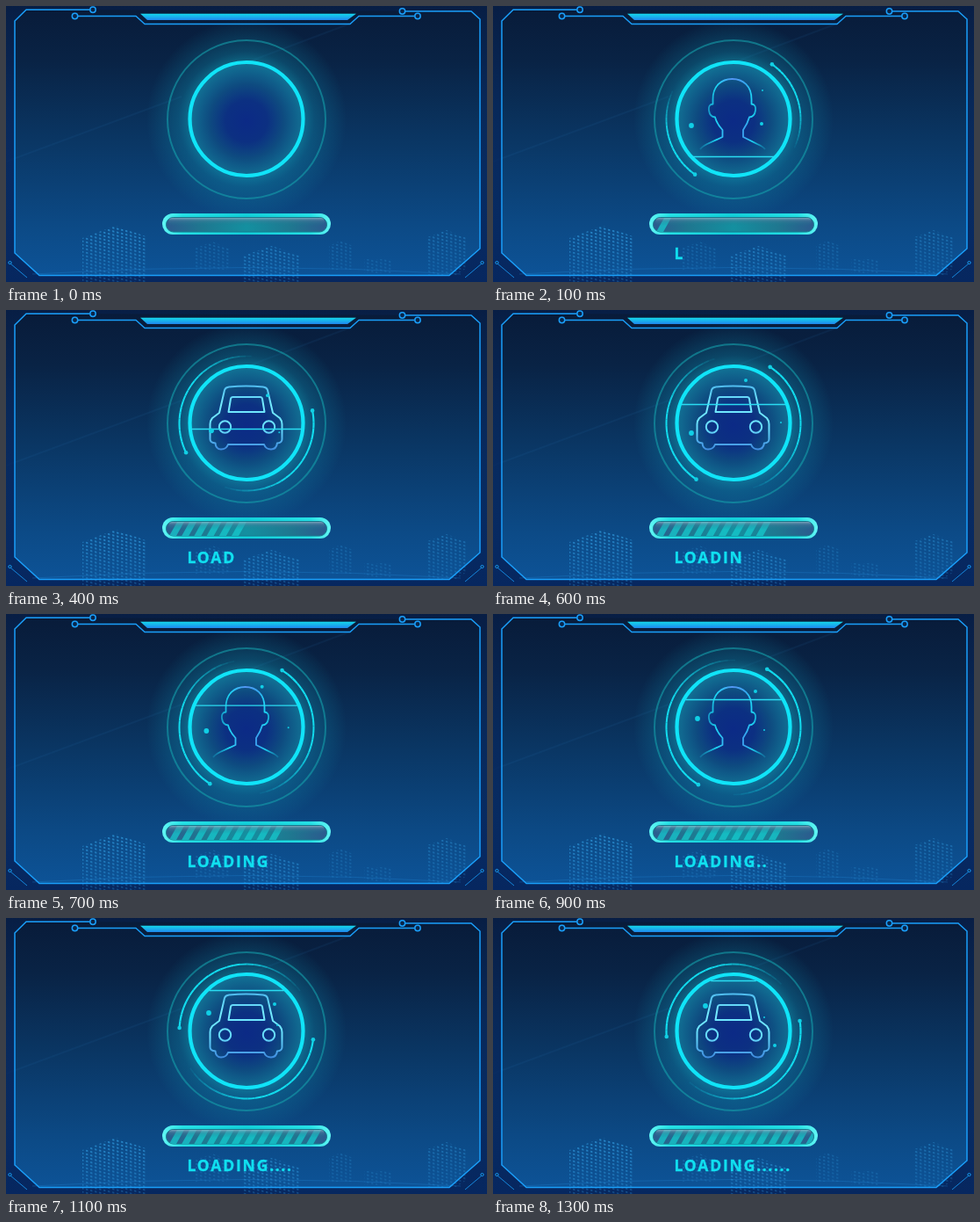
Write an HTML page that moves like this. It is 548 by 314 pixels and loops after 1400 ms.

```html
<!DOCTYPE html>
<html lang="en">
<head>
<meta charset="utf-8">
<title>Loading</title>
<style>
html, body { margin: 0; width: 100%; height: 100%; overflow: hidden; background: #0a2a55; }
svg { display: block; width: 100vw; height: 100vh; }
text { font: bold 17.5px "Open Sans", "Noto Sans", sans-serif; fill: #10e0f0; stroke: #10e0f0; stroke-width: .35px; }
</style>
</head>
<body>
<svg viewBox="0 0 548 314" fill="none">
  <defs>
    <linearGradient id="sky" x2="0" y2="1">
      <stop offset="0" stop-color="#081b39"/>
      <stop offset=".2" stop-color="#092345"/>
      <stop offset=".5" stop-color="#0a3765"/>
      <stop offset=".8" stop-color="#0c4a86"/>
      <stop offset="1" stop-color="#0d5499"/>
    </linearGradient>
    <linearGradient id="rim" x2="0" y2="1">
      <stop offset="0" stop-color="#07245a" stop-opacity=".35"/>
      <stop offset=".5" stop-color="#07245a" stop-opacity=".7"/>
      <stop offset="1" stop-color="#06235a" stop-opacity=".92"/>
    </linearGradient>
    <linearGradient id="title" x2="0" y2="1">
      <stop offset="0" stop-color="#14d6e8"/>
      <stop offset=".45" stop-color="#18b4ec"/>
      <stop offset="1" stop-color="#1f88ee"/>
    </linearGradient>
    <radialGradient id="halo" gradientUnits="userSpaceOnUse" cx="274" cy="129" r="114">
      <stop offset=".55" stop-color="#12a0b8" stop-opacity=".58"/>
      <stop offset=".68" stop-color="#0f8cac" stop-opacity=".34"/>
      <stop offset=".8" stop-color="#0f8cac" stop-opacity=".21"/>
      <stop offset="1" stop-color="#0f8cac" stop-opacity="0"/>
    </radialGradient>
    <radialGradient id="core" gradientUnits="userSpaceOnUse" cx="274" cy="131" r="68">
      <stop offset="0" stop-color="#0c2a86"/>
      <stop offset=".35" stop-color="#0c3082"/>
      <stop offset=".62" stop-color="#0e4b80"/>
      <stop offset="1" stop-color="#127697"/>
    </radialGradient>
    <linearGradient id="pill">
      <stop offset="0" stop-color="#62f6f4"/>
      <stop offset=".12" stop-color="#25dfe4"/>
      <stop offset=".5" stop-color="#12ced8"/>
      <stop offset=".88" stop-color="#25dfe4"/>
      <stop offset="1" stop-color="#62f6f4"/>
    </linearGradient>
    <linearGradient id="well">
      <stop offset="0" stop-color="#2c5a8e"/>
      <stop offset=".22" stop-color="#1f7790"/>
      <stop offset=".5" stop-color="#1490a0"/>
      <stop offset=".78" stop-color="#1f7790"/>
      <stop offset="1" stop-color="#2c5a8e"/>
    </linearGradient>
    <linearGradient id="gloss" x2="0" y2="1">
      <stop offset="0" stop-color="#93b6c8" stop-opacity=".75"/>
      <stop offset=".4" stop-color="#4c7f9c" stop-opacity=".4"/>
      <stop offset="1" stop-color="#0f7f90" stop-opacity="0"/>
    </linearGradient>
    <linearGradient id="skin" gradientUnits="userSpaceOnUse" x1="236" y1="0" x2="310" y2="0">
      <stop offset="0" stop-color="#1ad0ee" stop-opacity=".2"/>
      <stop offset=".25" stop-color="#1cd6f4"/>
      <stop offset=".5" stop-color="#5594f4"/>
      <stop offset=".7" stop-color="#35a8f0"/>
      <stop offset=".8" stop-color="#1cd6f4"/>
      <stop offset="1" stop-color="#1ad0ee" stop-opacity=".2"/>
    </linearGradient>
    <linearGradient id="paint" gradientUnits="userSpaceOnUse" x1="0" y1="86" x2="0" y2="159">
      <stop offset="0" stop-color="#4fbcf0"/>
      <stop offset=".3" stop-color="#74ecff"/>
      <stop offset=".68" stop-color="#66dcfc"/>
      <stop offset="1" stop-color="#3f8ce0"/>
    </linearGradient>
    <linearGradient id="fade" x2="0" y2="1">
      <stop offset="0" stop-color="#fff"/>
      <stop offset="1" stop-color="#fff" stop-opacity=".4"/>
    </linearGradient>
    <pattern id="lights" width="5" height="4" patternUnits="userSpaceOnUse" patternTransform="skewY(14)">
      <path d="M1 1h2.400v1.800h-2.400z" fill="#35a8ee"/>
    </pattern>
    <mask id="dim"><path d="M0 245H548V314H0z" fill="url(#fade)"/></mask>
    <clipPath id="wellClip"><rect x="183" y="241" width="182" height="16" rx="8"/></clipPath>
  </defs>

  <path d="M0 0H548V314H0z" fill="url(#sky)"/>
  <path d="M0 177L200 103M264 68L392 20" stroke="#2b78b8" stroke-width="2" opacity=".09"/>
  <path d="M0 0H548V314H0zM23 4L10 17V281L38 306.500H505L540 276V15L530 6z" fill="url(#rim)" fill-rule="evenodd"/>
  <path d="M30 305Q274 290 518 305" stroke="#2189d8" opacity=".3"/>
  <g fill="url(#lights)" mask="url(#dim)">
    <path d="M87 264L125 250L159 262V314H87z" opacity=".72"/>
    <path d="M270 284L303 273L334 284V314H270z" opacity=".72"/>
    <path d="M480 263L502 255L525 264V298L513 306H480z" opacity=".45"/>
    <path d="M215 276L235 268L255 276V300H215z" opacity=".35"/>
    <path d="M368 273L381 267L395 273V300H368zM408 288H440V304H408z" opacity=".35"/>
  </g>

  <g stroke="#1a9ffa" stroke-width="1.5">
    <path d="M95.500 4.300H23L10 17V281L38 306.500H505L540 276V15L530 6H455"/>
    <path d="M82 11.500H148L158 20.500H392L402 11.500H465.500" stroke-width="1.300"/>
    <path d="M5 293L24 309M542 293L523 309" stroke-width="1" opacity=".8"/>
    <g fill="#0a2448">
      <circle cx="99" cy="4.300" r="3.200"/>
      <circle cx="78.500" cy="11.500" r="3.200"/>
      <circle cx="451.500" cy="6" r="3.200"/>
      <circle cx="469" cy="11.500" r="3.200"/>
      <circle cx="4.500" cy="292" r="1.600" stroke-width="1"/>
      <circle cx="542.500" cy="292" r="1.600" stroke-width="1"/>
    </g>
  </g>
  <path d="M153 8.700H399L389 16H161z" fill="url(#title)"/>

  <circle cx="274" cy="129" r="114" fill="url(#halo)"/>
  <circle cx="274" cy="129" r="90" stroke="#14a0ac" stroke-width="2" opacity=".6"/>
  <circle cx="274" cy="128.500" r="64.500" fill="url(#core)" stroke="#10e4f8" stroke-width="4.200"/>

  <g id="live">
    <g id="arcs"></g>
    <g id="person" stroke="url(#skin)" stroke-width="1.8" stroke-linejoin="round">
      <path d="M236 163Q238 160 244 157L261.500 149V141Q255 134 253 126.500Q247 126 246 119Q245 112 250.500 111.500V106C250.500 91 260 83 272.500 83S294.500 91 294.500 106V111.500Q300 112 299 119Q298 126 292 126.500Q290 134 285 141V149L301 157Q308 160 310 163"/>
    </g>
    <g id="car" stroke="url(#paint)" stroke-width="2" stroke-linejoin="round">
      <path d="M249 91Q250 88 254 87.500Q273.500 85.500 293 87.500Q297 88 298 91L304 117L312 123Q314.500 126 314.500 130V147Q314.500 151 309 151.500Q308 158.500 302 158.500Q296 158.500 294 153H253Q251 158.500 245 158.500Q239 158.500 238.500 151.500Q232.500 151 232.500 147V130Q232.500 126 235 123L243 117z"/>
      <path d="M258.500 99H289.500Q291.500 99 292 101L294.500 116H253.500L256 101Q256.500 99 258.500 99z"/>
      <circle cx="249.500" cy="133" r="6.700"/>
      <circle cx="299.500" cy="133" r="6.700"/>
    </g>
    <path id="scan" stroke="#2adcf2" stroke-width="1.400"/>
    <g id="motes" fill="#10cfe6">
      <circle r="2.900"/><circle r="2"/><circle r="1"/>
    </g>
  </g>

  <rect x="178" y="236" width="192" height="24" rx="12" fill="url(#pill)"/>
  <rect x="182.500" y="240.500" width="183" height="16.500" rx="8.200" fill="url(#well)" stroke="#14788c"/>
  <g id="stripes" clip-path="url(#wellClip)" fill="#16cdd0" opacity=".72"></g>
  <rect x="185" y="241" width="178" height="9" rx="4.500" fill="url(#gloss)"/>

  <text x="206.400" y="287.800"><tspan id="word" letter-spacing="1.850"></tspan><tspan id="dots" letter-spacing="1.600"></tspan></text>
</svg>
<script>
const $ = id => document.getElementById(id);
const LOOP = 1400, STEP = 100, STRIPES = 13, PITCH = 14.2, SLICES = 24;
const CX = 274, CY = 129, ORBIT = 76.5;

// Each track holds its values at these steps.
const keys = [1, 3, 6, 9, 11, 13];
const scanY = [171.5, 149.5, 107.5, 97.5, 82.5, 71.5];
const filled = [1, 4, 9, 10, 12, 13];
const tail = [80, 115, 130, 150, 140, 140];
const heads = [
  [-55, -190.5, -236.3, -238.4, -353, -369],
  [125, 12, -57, -60, -177, -184.5]
];
const motes = [
  { x: [226, 238, 226, 233, 231, 242], y: [136, 136, 140, 119, 108, 100] },
  { x: [306, 303, 288, 299, 306, 321], y: [134, 106, 80, 88, 98, 145] },
  { x: [307, 303, 328, 309, 309, 309], y: [96, 145, 128, 132, 122, 113] }
];

function at(track, k) {
  let i = 0;
  while (i < keys.length - 2 && k > keys[i + 1]) i++;
  const u = (k - keys[i]) / (keys[i + 1] - keys[i]);
  return track[i] + (track[i + 1] - track[i]) * u;
}

function add(parent, name, attrs) {
  const el = document.createElementNS("http://www.w3.org/2000/svg", name);
  for (const a in attrs) el.setAttribute(a, attrs[a]);
  return parent.appendChild(el);
}

function onOrbit(deg) {
  const a = deg * Math.PI / 180;
  return [CX + ORBIT * Math.cos(a), CY + ORBIT * Math.sin(a)];
}

const stripes = Array.from({ length: STRIPES }, (_, i) =>
  add($("stripes"), "path", { d: `M${186 + i * PITCH} 257h8l9 -16h-8z` }));

const arcs = heads.map(track => ({
  track,
  slices: Array.from({ length: SLICES }, (_, i) => add($("arcs"), "path", {
    stroke: "#12dcee",
    "stroke-width": 2.2 - 0.5 * i / SLICES,
    opacity: Math.min(1, 2.1 * (1 - i / SLICES))
  })),
  dot: add($("arcs"), "circle", { r: 2.3, fill: "#12cfe4" })
}));

function drawArc({ track, slices, dot }, k) {
  const head = at(track, k), part = at(tail, k) / SLICES;
  slices.forEach((el, i) => {
    const from = onOrbit(head + i * part), to = onOrbit(head + (i + 1) * part);
    el.setAttribute("d", `M${from}A${ORBIT} ${ORBIT} 0 0 1 ${to}`);
  });
  const [x, y] = onOrbit(head);
  dot.setAttribute("cx", x);
  dot.setAttribute("cy", y);
}

function draw(k) {
  const show = (el, on) => { el.style.display = on ? "" : "none"; };
  const label = "LOADING......".slice(0, k);
  $("word").textContent = label.slice(0, 7);
  $("dots").textContent = label.slice(7);

  const count = k ? Math.round(at(filled, k)) : 0;
  stripes.forEach((el, i) => show(el, i < count));
  show($("live"), k > 0);
  if (!k) return;

  const isPerson = k < 4 || (k > 6 && k < 11);
  show($("person"), isPerson);
  show($("car"), !isPerson);
  arcs.forEach(arc => drawArc(arc, k));

  const y = at(scanY, k), half = Math.sqrt(63 ** 2 - (y - CY) ** 2);
  $("scan").setAttribute("d", `M${CX - half} ${y}h${2 * half}`);
  motes.forEach((m, i) => {
    const el = $("motes").children[i];
    el.setAttribute("cx", at(m.x, k));
    el.setAttribute("cy", at(m.y, k));
  });
}

const start = performance.now();
function tick() {
  draw(Math.floor((performance.now() - start) % LOOP / STEP));
  requestAnimationFrame(tick);
}
tick();
</script>
</body>
</html>
```
